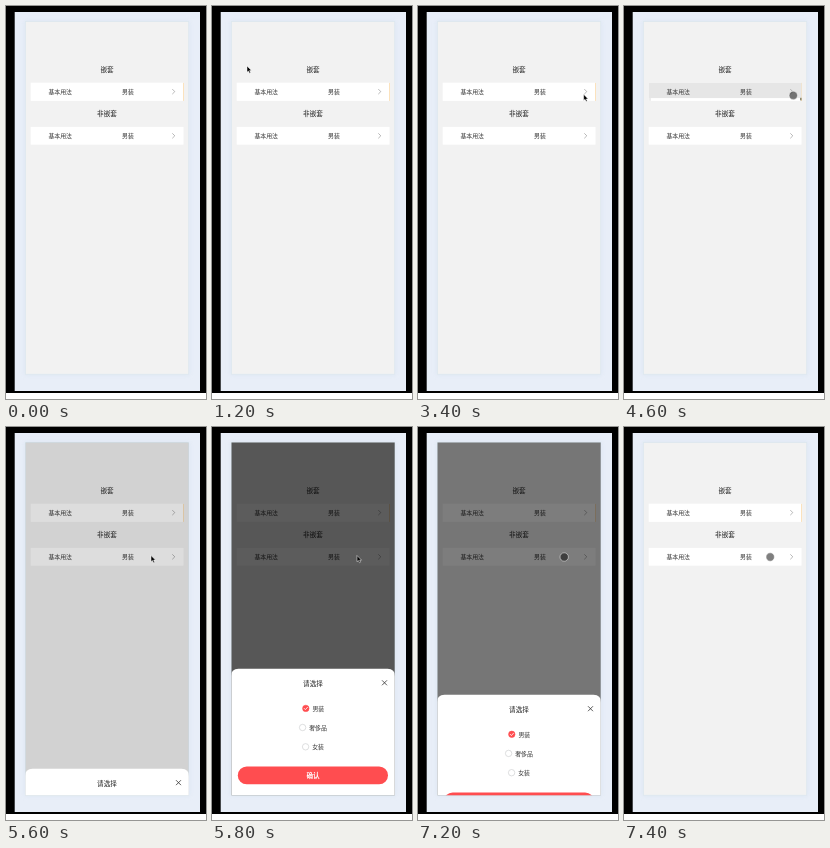
An HTML page for the animation above (8 s loop, 200 by 393 pixels).

```html
<!DOCTYPE html>
<html lang="zh-CN">
<head>
<meta charset="utf-8">
<title>选择弹窗</title>
<style>
html, body { margin: 0; width: 100%; height: 100%; overflow: hidden; background: #fff; }
svg { display: block; width: 100vw; height: 100vh; }
text { font: 5.9px "Noto Sans CJK SC", "Noto Sans CJK", sans-serif; fill: #333; }
.title { font-size: 6.6px; font-weight: 500; fill: #222; text-anchor: middle; }
.line { fill: none; stroke-linecap: round; stroke-linejoin: round; }
</style>
</head>
<body>
<svg viewBox="0 0 200 393">
  <defs>
    <clipPath id="screen"><rect x="19.5" y="15.5" width="163.2" height="352.7"/></clipPath>
    <filter id="soft" x="-20%" y="-20%" width="140%" height="140%"><feGaussianBlur stdDeviation="2"/></filter>
  </defs>
  <rect width="200" height="387" fill="#000"/>
  <rect x="8.7" y="6" width="185.3" height="379" fill="#e8eef8"/>
  <rect x="18.5" y="14.5" width="165.2" height="354.7" fill="#d9e4f0" opacity=".7" filter="url(#soft)"/>
  <rect x="19.5" y="15.5" width="163.2" height="352.7" fill="#f2f2f2" stroke="#dce7ee" stroke-width=".7"/>
  <g clip-path="url(#screen)">
    <text class="title" x="101" y="65.9">嵌套</text>
    <text class="title" x="101" y="110.1">非嵌套</text>
    <rect x="24.7" y="76.7" width="152.8" height="18.2" fill="#fff"/>
    <rect x="177.1" y="76.9" width=".8" height="18" fill="#fbdcae"/>
    <g id="pressed">
      <rect x="24.7" y="76.7" width="152.8" height="15.4" fill="#e6e6e6"/>
      <rect x="24.7" y="92" width="2.3" height="2.8" fill="#ececec"/>
      <rect x="176" y="91.8" width="1.6" height="2.6" fill="#8d8b72"/>
    </g>
    <rect x="24.7" y="120.9" width="152.8" height="17.8" fill="#fff"/>
    <g id="cells"></g>
    <rect id="shade" x="19" y="15" width="164.5" height="354"/>
    <g id="sheet">
      <path d="M19 134V7.5Q19 0 26.5 0H175.5Q183 0 183 7.5V134Z" fill="#fff"/>
      <text class="title" x="101" y="17.4">请选择</text>
      <path class="line" d="M170.3 11.8l4.4 4.4m0-4.4l-4.4 4.4" stroke="#333" stroke-width=".8"/>
      <g id="options"></g>
      <rect x="25.8" y="97.7" width="150.2" height="17.8" rx="8.9" fill="#ff4d50"/>
      <text class="title" x="101" y="109.2" style="fill:#fff;font-weight:700">确认</text>
    </g>
  </g>
  <g id="cursor">
    <path id="arrow" d="M0 0V6.2L1.4 5L2.5 7.2L3.6 6.7L2.6 4.6H4.5Z" fill="#000" stroke="#fff" stroke-width=".5"/>
    <circle id="touch" r="4.2" fill="#000" fill-opacity=".5" stroke="#fff" stroke-opacity=".6" stroke-width=".8"/>
  </g>
</svg>
<script>
const LOOP = 8000, STEP = 100;
const el = id => document.getElementById(id);
const show = (id, on) => el(id).setAttribute('visibility', on ? 'inherit' : 'hidden');
const within = (t, spans) => spans.some(([from, to]) => t >= from && t < to);

// Time, x, y of the pointer tip
const path = [
  [600, 95, 81], [700, 95, 81], [1200, 35, 60], [1600, 147, 170.5],
  [1700, 147, 170.5], [2200, 147.3, 82.5], [2900, 147.3, 82.5],
  [3500, 169.3, 89.5], [4600, 169.3, 89.5], [5100, 145, 120],
  [5200, 145, 128.5], [5900, 145, 128.5], [6500, 108.5, 345.5],
  [6700, 108.5, 345.5], [6800, 146.2, 130], [LOOP, 146.2, 130]
];
const hidden = [[0, 600], [700, 1200]];
const touching = [[2500, 2900], [3600, 3700], [3900, 4700], [5300, 5600], [6600, 6800], [6900, LOOP]];
const rowPressed = [[2700, 2900], [4300, 4700]];
// Time and share of the sheet that is open
const opening = [
  [0, 0], [5500, 0], [5600, .21], [5700, .78], [5800, 1],
  [7100, 1], [7200, .795], [7300, .27], [7400, 0], [LOOP, 0]
];

function sample(keys, t, col = 1) {
  const i = keys.findIndex(k => k[0] >= t);
  if (i <= 0) return keys[0][col];
  const a = keys[i - 1], b = keys[i];
  return a[col] + (b[col] - a[col]) * (t - a[0]) / (b[0] - a[0]);
}

const cell = y => `
  <text x="42.4" y="${y + 2.2}">基本用法</text>
  <text x="116" y="${y + 2.2}">男装</text>
  <path class="line" d="M166.6 ${y - 2.2}l2.2 2.2l-2.2 2.2" stroke="#999" stroke-width=".7"/>`;

const option = ([label, x, y, checked]) => `
  <circle cx="${x}" cy="${y}" r="3.2" fill="${checked ? '#ff4d50' : '#fff'}"
    stroke="${checked ? '#ff4d50' : '#c8c9cc'}" stroke-width=".6"/>
  ${checked ? `<path class="line" d="M${x - 1.6} ${y}l1.2 1.3l2.1-2.4" stroke="#fff" stroke-width=".8"/>` : ''}
  <text x="${x + 6.6}" y="${y + 2.2}">${label}</text>`;

el('cells').innerHTML = [85.6, 129.8].map(cell).join('');
el('options').innerHTML = [
  ['男装', 93.8, 39.6, true], ['奢侈品', 90.6, 58.7, false], ['女装', 93.6, 78, false]
].map(option).join('');

function draw(now) {
  const t = Math.floor(now % LOOP / STEP) * STEP;
  const open = sample(opening, t);
  const touch = within(t, touching);
  el('sheet').setAttribute('transform', `translate(0 ${368.2 - 126.4 * open})`);
  show('sheet', open > 0);
  el('shade').setAttribute('opacity', .64 * open);
  show('pressed', within(t, rowPressed));
  show('cursor', !within(t, hidden));
  show('arrow', !touch);
  show('touch', touch);
  el('cursor').setAttribute('transform', `translate(${sample(path, t)} ${sample(path, t, 2)})`);
}

const start = performance.now();
function tick() {
  draw(performance.now() - start);
  requestAnimationFrame(tick);
}
tick();
</script>
</body>
</html>
```
